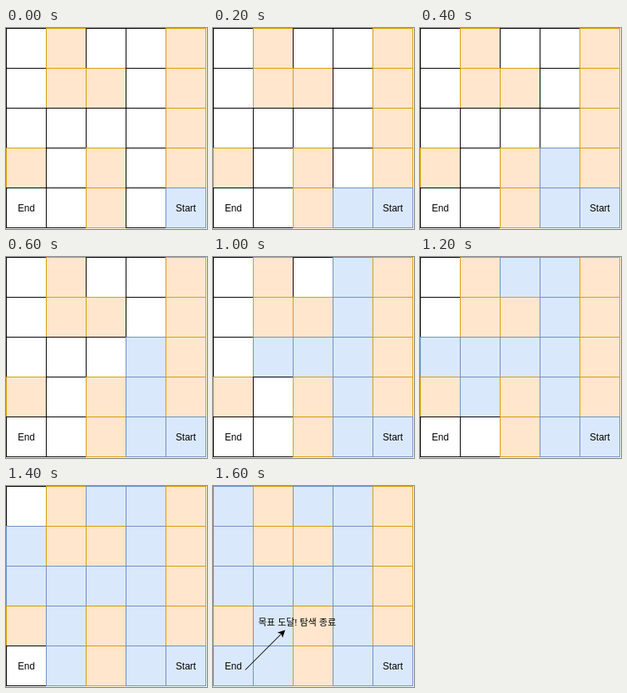
These frames come from a looping animation (252 by 252 pixels, 2200 ms). An HTML page with a canvas:

```html
<!DOCTYPE html>
<html lang="ko">
<head>
<meta charset="utf-8">
<style>
  html, body { margin: 0; width: 100%; height: 100%; overflow: hidden; background: #fff; }
  canvas { display: block; }
</style>
</head>
<body>
<canvas id="stage" width="252" height="252"></canvas>
<script>
const ctx = document.getElementById('stage').getContext('2d');
const CELL = 50, STEP = 200, LOOP = 2200;
const maze = [
  '.#..#',
  '.##.#',
  '....#',
  '#.#.#',
  '..#..',
];
const size = maze.length;
const styles = {
  open: ['#fff', '#000'],
  wall: ['#ffe6cc', '#d79b00'],
  seen: ['#dae8fc', '#6c8ebf'],
};

// Breadth-first distances from the bottom right cell
function search() {
  const dist = maze.map(() => Array(size).fill(Infinity));
  const queue = [[size - 1, size - 1]];
  dist[size - 1][size - 1] = 0;
  for (const [x, y] of queue) {
    for (const [dx, dy] of [[1, 0], [-1, 0], [0, 1], [0, -1]]) {
      const nx = x + dx, ny = y + dy;
      if (maze[ny]?.[nx] !== '.' || dist[ny][nx] < Infinity) continue;
      dist[ny][nx] = dist[y][x] + 1;
      queue.push([nx, ny]);
    }
  }
  return dist;
}
const dist = search();
const goal = dist[size - 1][0];

function drawCell(x, y, step) {
  const kind = maze[y][x] === '#' ? 'wall' : dist[y][x] <= step ? 'seen' : 'open';
  [ctx.fillStyle, ctx.strokeStyle] = styles[kind];
  const box = [x * CELL + 0.5, y * CELL + 0.5, CELL, CELL];
  ctx.fillRect(...box);
  ctx.strokeRect(...box);
}

function drawText(text, x, y, px = 12) {
  ctx.font = `${px}px "Liberation Sans", "Noto Sans CJK KR", "Noto Sans CJK", sans-serif`;
  ctx.textAlign = 'center';
  ctx.fillStyle = '#000';
  ctx.fillText(text, x, y);
}

function drawArrow(x1, y1, x2, y2) {
  const tip = Math.hypot(x2 - x1, y2 - y1) - 1.1;
  ctx.save();
  ctx.translate(x1, y1);
  ctx.rotate(Math.atan2(y2 - y1, x2 - x1));
  ctx.fillStyle = ctx.strokeStyle = '#000';
  ctx.beginPath();
  ctx.moveTo(0, 0);
  ctx.lineTo(tip - 5.25, 0);
  ctx.stroke();
  ctx.beginPath();
  ctx.moveTo(tip, 0);
  ctx.lineTo(tip - 7, 3.5);
  ctx.lineTo(tip - 5.25, 0);
  ctx.lineTo(tip - 7, -3.5);
  ctx.closePath();
  ctx.fill();
  ctx.stroke();
  ctx.restore();
}

function draw() {
  const step = Math.floor((performance.now() % LOOP) / STEP);
  ctx.fillStyle = '#fff';
  ctx.fillRect(0, 0, 252, 252);
  for (let y = 0; y < size; y++)
    for (let x = 0; x < size; x++) drawCell(x, y, step);
  drawText('End', 25.5, 230);
  drawText('Start', 225.5, 230);
  if (step >= goal) {
    drawArrow(40.5, 230.5, 90.5, 180.5);
    drawText('목표 도달! 탐색 종료', 105.5, 175, 11.5);
  }
  requestAnimationFrame(draw);
}
draw();
</script>
</body>
</html>
```
